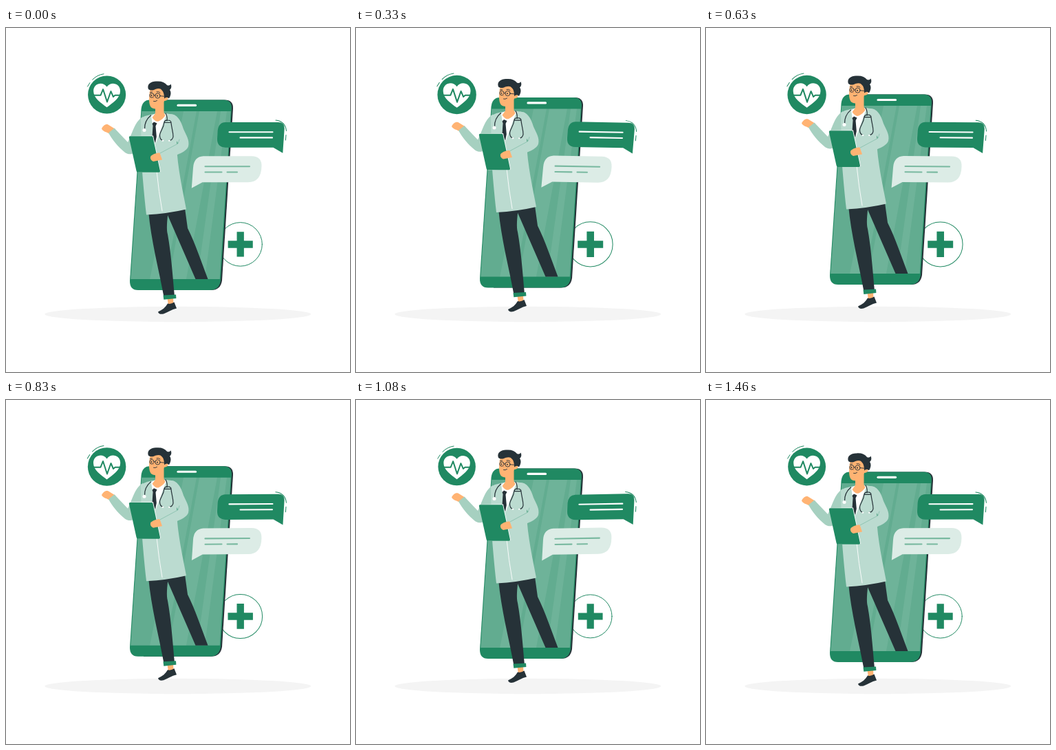
An HTML page that plays this animation: 500x500 px, repeating every 1.5 s.

```html
<!DOCTYPE html>
<html lang="en">
<head>
<meta charset="utf-8">
<title>Online doctor</title>
<style>
  html, body { margin: 0; width: 100%; height: 100%; overflow: hidden; background: #fff; }
  svg { display: block; width: 100%; height: 100%; }
  .green { fill: #208962; }
  .dark { fill: #263238; }
  .skin { fill: #ffb373; }
  .coat { fill: #bbdbd0; }
  .sleeve { fill: #a6d0c0; }
  .line { fill: none; stroke: #208962; stroke-linecap: round; stroke-linejoin: round; }
  .ink { fill: none; stroke: #263238; stroke-linecap: round; }
  .white { fill: none; stroke: #fff; stroke-linecap: round; }
</style>
</head>
<body>
<svg viewBox="0 0 500 500">
  <ellipse cx="249.7" cy="416" rx="193.5" ry="11.2" fill="#f4f4f4"/>

  <g id="plus">
    <circle class="line" cx="340.6" cy="314.4" r="32" fill="none"/>
    <path class="green" d="M335.5 296h10.4v13.3h13v10.4h-13v13h-10.4v-13h-13v-10.4h13z"/>
  </g>

  <g id="bob">
    <g id="phone">
      <path class="dark" d="M210 104.5H318Q330.500 104.500 330 117L314 367Q312 381 298 381H200Z"/>
      <path class="green" d="M209 104.500H316Q328.500 104.500 328 117L312 367Q310 381 296 381H192Q179.500 381 180 367L196.500 118Q198 104.500 209 104.500Z"/>
      <path fill="#62ac90" d="M197.300 121H326.800L310.800 365H181.200Z"/>
      <path fill="#fff" opacity=".08" d="M258 121H277L232 365H209ZM281 121H307L262 365H237ZM312 121H321L289 365H278Z"/>
      <path class="white" stroke-width="3.2" d="M250 112.400H275.500"/>
    </g>

    <g id="legs">
      <path class="dark" d="M232 264L260 262L264 291C275 313 284 340 293.500 365H275.500L235 272Z"/>
      <path class="dark" d="M207 266L236 265C234 280 233 293 235 300C240 328 242 357 245 390L229.500 391C222 350 211 310 207 266Z"/>
      <path class="skin" d="M234.500 393L243 392L243.500 401L236 403Z"/>
      <path class="green" d="M228.500 388.500L247 387.500L247.400 393L229.300 394.800Z"/>
      <path class="dark" d="M221 412.500C227 410 232 406 235 400.500Q239 402 244.500 398.500L248 407.500C241 409 235 413 229 415.500Q222 417 221 412.500Z"/>
    </g>

    <g id="torso">
      <path class="skin" d="M139 146.500C141 142 145 139 148.500 140.500L159 147L151 154L146 151.500Q141 150 139 146.500Z"/>
      <path class="sleeve" d="M157.500 145.500L177 166C184 153 186 137 199 129L208 150L193 176C187 184 179 185 173 181C163 173 154 162 149 152.500Z"/>
      <path class="coat" d="M196 131Q203 127 212 125.500L232 124L244 126C250 131 251 150 248 169C249 203 257 236 262 263.500Q234 270 204 271.500C201 245 199 222 197 196Z"/>
      <path fill="#fff" d="M211 128L217.500 168L233 126Q222 119 211 128Z"/>
      <path class="skin" d="M217 111V124L212.500 130Q217 137 222 135.500Q229 132 231.500 127L229.500 123V104Z"/>
      <path class="dark" d="M212.500 139L215 136.500L219.500 138.500L217.500 142.500L218.800 158L217 167L212.500 158L213.500 142Z"/>
      <path class="white" stroke-width=".9" d="M219 208Q222 238 227 266"/>
      <path fill="#62ac90" d="M248 153L254 163L248 169Z"/>
      <path class="coat" d="M238 125C249 125 254 134 258 147C262 156 267 163 265 172C262 181 245 186 226 191.500L223.500 182L250 167.500L240 150Z"/>
      <path class="line" stroke="#208962" stroke-width=".5" opacity=".55" d="M224 182L250 168L252 162"/>
    </g>

    <g id="clipboard">
      <path fill="#fff" d="M181 157L214 156.500L225 209L192 210Z"/>
      <path class="green" d="M180.500 157.200H211.500Q213 157 213.500 158.500L224 208Q224 209.800 222.500 209.800H191.500Q190 209.800 189.600 208L178.800 159Q178.500 157.300 180.500 157.200Z"/>
      <path class="skin" d="M210 187C213 183 219 181.500 223.500 181.500L227 191.500L214 194Q209 191.500 210 187Z"/>
    </g>

    <g id="stethoscope">
      <path class="ink" stroke-width="1.200" d="M210.500 127Q201 135 201.500 147M232 124Q235 129 234 135M230 137Q231 133.500 235 134Q240 134 240 138C241 147 243 151 243 158Q242 163 237.500 163.500M230 137C229 147 223 151 223.500 157Q224 162 227.500 163.500M230 137.500H239.500"/>
      <path class="white" stroke-width="2" d="M227.500 163.800h.8M237 163.800h.8"/>
      <circle cx="201" cy="148.500" r="2.500" fill="#fff"/>
    </g>

    <g id="head">
      <path class="skin" d="M210 87C208 95 207 107 209.500 113C212 119 221 119 227 112L230 106C235 106 237 102 235 98L230 86Z"/>
      <path class="dark" d="M207 89C204 81 212 77 219 77.500C226 77 231 79 234 83C236 84 238 83.500 239.500 81.500C241 85 240.500 88 238 90C241 94 239 99 237 102.500Q234 99 230 102.500C230 97 229 93 227 91C224 87 221 88 217 89C213 91 210 91 207 89Z"/>
      <g class="ink" stroke-width=".9">
        <circle cx="212" cy="98" r="3.200"/>
        <circle cx="220.500" cy="98.500" r="3.600"/>
        <path d="M215.200 98H217M224 98.700L230 99.300M209.500 93.500L212.500 93M219 92.800Q222 92 224 94M214.500 106.500Q217 107.500 219.500 105.500"/>
      </g>
      <path class="ink" stroke-width="1.800" d="M211.500 98v.3M220 98.500v.3"/>
      <path fill="none" stroke="#e98f50" stroke-width=".8" d="M215.500 98Q213 102 215 103"/>
    </g>
  </g>

  <g id="greenBubble">
    <path class="green" d="M319 137H395Q405 136.500 404.700 146L402.300 181.700L388.500 173.700H319Q306.500 173 307 161L307.700 149Q309 137.300 319 137Z"/>
    <path class="white" stroke-width="2.100" d="M324.500 151.200H387.500M340.500 159.400H387"/>
    <path class="line" d="M392 134Q406 135.500 407.500 149.500M407 155.500L406.400 163"/>
  </g>

  <g id="paleBubble">
    <path fill="#dcece6" d="M287 186.200H357Q372 186.500 371.500 201Q371 224 352 224.200H285.500L269.800 232.700L272 203Q273 187 287 186.200Z"/>
    <path class="line" style="stroke:#79b9a0" stroke-width="2.100" d="M289.500 201.200H354M289.500 209.500H313.500M321.500 209.500H336"/>
  </g>

  <g id="heart">
    <circle class="green" cx="146.600" cy="97" r="27.750"/>
    <path fill="#fff" d="M146.600 115.500C138 109 127 102 127 91.500C127 80 141 77 146.600 85.500C152 77 166.200 80 166.200 91.500C166.200 102 155 109 146.600 115.500Z"/>
    <path class="line" stroke-width="2" d="M126 97.700H137.500L141 89L147 107.500L152.500 92L156 100L158.500 97.700H167"/>
    <path class="line" d="M118.300 85L121.700 79.500M125.500 75Q132 68 142 66.500"/>
  </g>
</svg>
<script>
  const PERIOD = 1500;
  const move = (id, value) => document.getElementById(id).setAttribute('transform', value);
  const scaleAt = (x, y, s) => `translate(${x} ${y}) scale(${s}) translate(${-x} ${-y})`;

  function draw() {
    const wave = delay => 2 * Math.PI * (performance.now() - delay) / PERIOD;
    const lift = -4.2 * (1 - Math.cos(wave(0)));
    const tilt = Math.sin(wave(0));
    const pulse = 1 + 0.02 * Math.sin(wave(90));
    move('bob', `translate(0 ${lift})`);
    move('greenBubble', `rotate(${tilt} 356 159)`);
    move('paleBubble', `rotate(${tilt} 321 207)`);
    move('heart', scaleAt(146.6, 97, pulse));
    move('plus', scaleAt(340.6, 314.4, pulse));
    requestAnimationFrame(draw);
  }
  draw();
</script>
</body>
</html>
```
